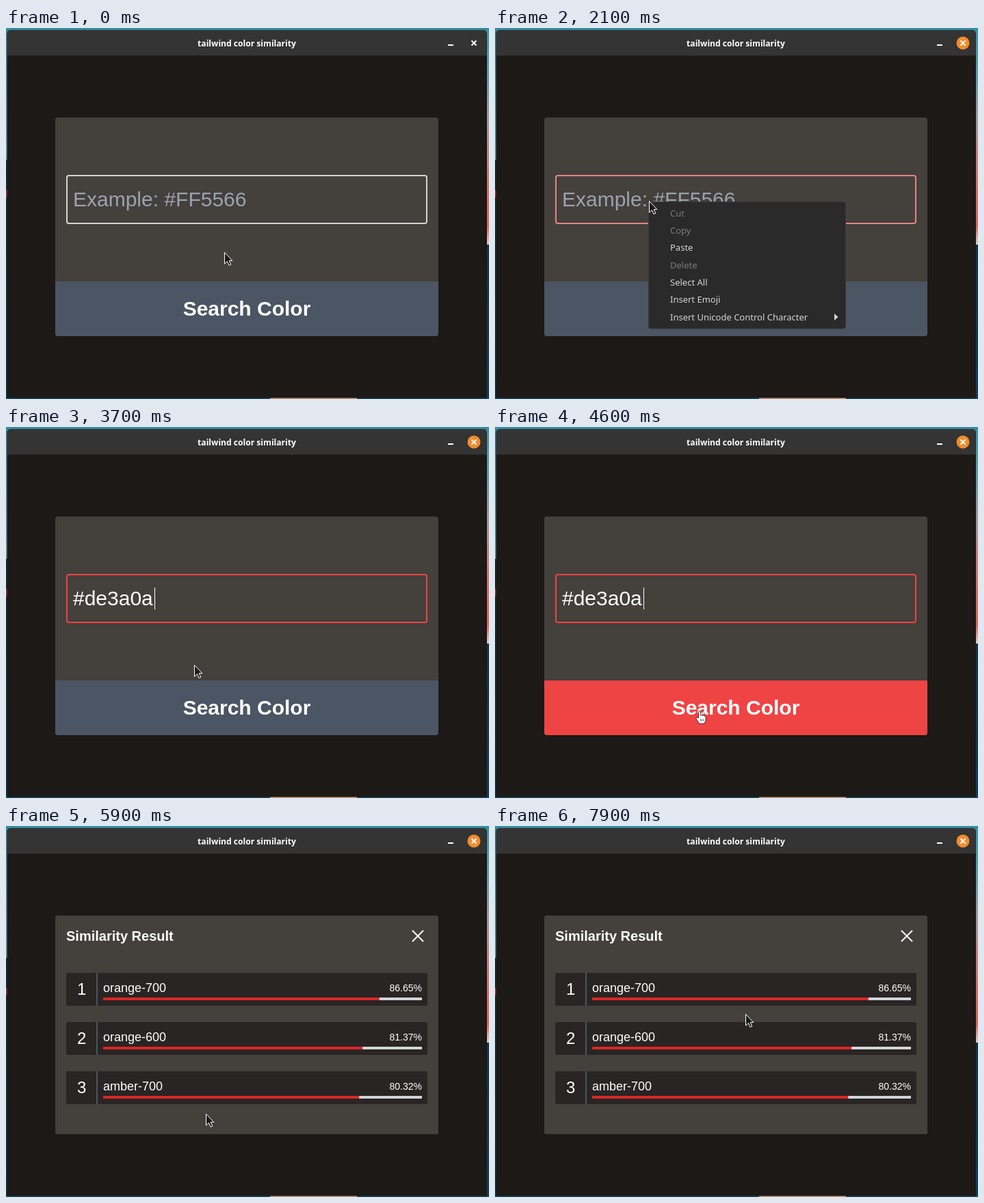
Recreate the animation shown at these times as an HTML page. Size 706x543 px, loop 8000 ms.

```html
<!DOCTYPE html>
<html lang="en">
<head>
<meta charset="utf-8">
<title>tailwind color similarity</title>
<style>
  html, body { margin: 0; width: 100%; height: 100%; overflow: hidden; background: #1c1917; }
  svg { display: block; width: 706px; height: 543px; cursor: default; }
  .label { font-family: "Liberation Sans", Arial, sans-serif; color: #fff; white-space: pre; }
  .bold { font-weight: 700; }
  .hint { color: #9ca3af; }
  text { font: 13px "Noto Sans", "Open Sans", sans-serif; fill: #d6d6d6; }
  text.off { fill: #7b7b7b; }
  text.title { font-size: 12.1px; font-weight: 700; fill: #fff; }
</style>
</head>
<body>
<svg viewBox="0 0 706 543" xmlns="http://www.w3.org/2000/svg">
  <defs>
    <linearGradient id="left" x2="0" y2="1">
      <stop offset="0" stop-color="#2f8495"/><stop offset=".35" stop-color="#5fa3ae"/>
      <stop offset=".35" stop-color="#12303f"/><stop offset="1" stop-color="#0b3a50"/>
    </linearGradient>
    <linearGradient id="right" x2="0" y2="1">
      <stop offset="0" stop-color="#3a96a5"/><stop offset=".12" stop-color="#5aa0ab"/>
      <stop offset=".25" stop-color="#a59a9e"/><stop offset=".42" stop-color="#d8736a"/>
      <stop offset=".53" stop-color="#dd655c"/><stop offset=".58" stop-color="#d9cfca"/>
      <stop offset=".58" stop-color="#123448"/><stop offset="1" stop-color="#0c4159"/>
    </linearGradient>
  </defs>

  <!-- desktop -->
  <rect width="706" height="5" fill="#358c9d"/>
  <rect y="4" width="4" height="539" fill="url(#left)"/>
  <rect y="237" width="4" height="11" fill="#a33a35"/>
  <rect x="700" y="4" width="6" height="539" fill="url(#right)"/>
  <rect y="540" width="706" height="3" fill="#0f4559"/>
  <rect x="386" y="541" width="127" height="2" fill="#d09a75"/>

  <!-- window -->
  <path d="M1.500 541.500V9q0-6 6-6H697q6 0 6 6V541.500Z" fill="#1c1917"/>
  <path d="M2 40V9q0-6 6-6H696.500q6 0 6 6V40Z" fill="#343434"/>
  <path d="M2 40.500H702.500" stroke="#262524"/>
  <text class="title" x="352" y="27" text-anchor="middle">tailwind color similarity</text>
  <rect x="646" y="24" width="8" height="2" fill="#fff"/>
  <circle id="close" cx="684" cy="22" r="9.500" fill="#f28b2d"/>
  <path d="M680.500 18.500l7 7m0-7l-7 7" stroke="#fff" stroke-width="2"/>

  <!-- search form -->
  <rect x="72" y="131" width="560" height="320" rx="4" fill="#44403c"/>
  <path id="button" d="M72 371H632V447q0 4-4 4H76q-4 0-4-4Z"/>
  <rect id="field" x="89" y="216" width="526" height="70" rx="3" fill="none" stroke-width="2"/>
  <g id="form"></g>
  <rect id="caret" y="235" width="1" height="32" fill="#fff"/>

  <!-- result panel -->
  <g id="result">
    <rect x="72" y="131" width="560" height="320" rx="4" fill="#44403c"/>
    <path d="M594.500 153.500l15 15m0-15l-15 15" stroke="#fff" stroke-width="2" stroke-linecap="round"/>
    <g id="rows"></g>
  </g>

  <!-- context menu -->
  <g id="menu">
    <rect x="224.500" y="254.500" width="288" height="185.500" rx="3" fill="#2a2a2a" stroke="#3a3937"/>
    <rect id="hover" x="225" y="309" width="287" height="25" fill="#414141"/>
    <g id="items"></g>
    <path d="M496 418l5.500 5-5.500 5Z" fill="#d6d6d6"/>
  </g>

  <!-- pointers, hot spot at 0,0 -->
  <g id="pointer">
    <path id="arrow" d="M.5.500V17.200L4.400 13.600 7 19.400 9.800 18.200 7.200 12.500H11.800Z" fill="#1b1b1b" stroke="#fff" stroke-linejoin="round"/>
    <g id="beam" fill="none">
      <path d="M-3.500-7.500H3.500M-3.500 7.500H3.500M0-7.500V7.500" stroke="#fff" stroke-width="3"/>
      <path d="M-3-7.500H3M-3 7.500H3M0-7.500V7.500" stroke="#1b1b1b"/>
    </g>
    <g id="hand" stroke="#1b1b1b" stroke-width=".8">
      <path d="M-1.500 10V1q0-1.500 1.500-1.500T1.500 1V6q1.500-1 2.700.300 1.500-.800 2.500.500 2.300-.300 2.300 2V13q0 2-1.500 3.500V18H-1.500V16L-5 11q-.500-2 1.500-2Z" fill="#fff"/>
      <path d="M1.500 11.500v3M3.700 11.500v3M5.900 11.500v3"/>
    </g>
  </g>
</svg>
<script>
const LOOP = 8000, STEP = 100;
const FOCUS = 1000, MENU = 2050, PASTE = 3300, HOVER = 3950, CLICK = 4650, REVEAL = 4900, DONE = 5300;
const RED = [239, 68, 68], LIGHT = [214, 211, 209], SLATE = [75, 85, 99];
const el = id => document.getElementById(id);

// page text placed by its baseline, in a box from x to x + width
function label(text, x, baseline, size, style = '', align = 'left', width = 300) {
  const ascent = Math.round(size * .905), height = ascent + Math.round(size * .212);
  return `<foreignObject x="${x}" y="${baseline - ascent}" width="${width}" height="${height}">
    <div xmlns="http://www.w3.org/1999/xhtml" class="label ${style}"
      style="font-size:${size}px;line-height:${height}px;text-align:${align}">${text}</div></foreignObject>`;
}

el('form').innerHTML = label('Search Color', 72, 421, 30, 'bold', 'center', 560) +
  `<g id="hint">${label('Example: #FF5566', 98, 261, 30, 'hint')}</g>` +
  `<g id="value">${label('#de3a0a', 98, 261, 30)}</g>`;

el('rows').innerHTML = label('Similarity Result', 88, 168, 20, 'bold') +
  [['orange-700', 86.65], ['orange-600', 81.37], ['amber-700', 80.32]].map(([name, score], i) => {
    const y = 215 + 72 * i;
    return `<rect x="88" y="${y}" width="528" height="48" rx="2" fill="#292524"/>
      <rect x="132" y="${y}" width="2" height="48" fill="#4b5563"/>
      <rect x="142" y="${y + 36}" width="466" height="4" fill="#d1d5db"/>
      <rect x="142" y="${y + 36}" width="${4.66 * score}" height="4" fill="#dc2626"/>` +
      label(i + 1, 104, y + 32, 24) + label(name, 142, y + 28, 18) +
      label(score + '%', 308, y + 27, 14, '', 'right');
  }).join('');

const items = ['Cut', 'Copy', 'Paste', 'Delete', 'Select All', 'Insert Emoji', 'Insert Unicode Control Character'];
el('items').innerHTML = items.map((name, i) =>
  `<text x="256" y="${Math.round(275.8 + 25.3 * i)}" class="${/Cut|Copy|Delete/.test(name) ? 'off' : ''}">${name}</text>`).join('');

// pointer strokes: from, to, x, y
const moves = [
  [0, 600, 229, 213], [600, 1100, 234, 246], [1300, 1600, 225, 253], [2300, 2700, 258, 337],
  [2800, 3000, 264, 317], [3400, 4200, 299, 416], [5800, 5900, 292, 421], [5900, 6500, 150, 200],
  [6500, 7000, 198, 215], [7000, 7500, 168, 231], [7600, 7900, 366, 275]
];

// cubic-bezier(.4, 0, .2, 1)
function ease(x) {
  let lo = 0, hi = 1, u = .5;
  for (let i = 0; i < 20; i++) {
    u = (lo + hi) / 2;
    if (1.2 * u * (1 - u) ** 2 + .6 * u * u * (1 - u) + u ** 3 < x) lo = u; else hi = u;
  }
  return 3 * u * u * (1 - u) + u ** 3;
}
const part = (t, from, to) => Math.min(1, Math.max(0, (t - from) / (to - from)));
const fade = (t, from, length = 150) => ease(part(t, from, from + length));
const within = (t, from, to) => t >= from && t < to;
const mix = (a, b, k) => `rgb(${a.map((v, i) => Math.round(v + (b[i] - v) * k))})`;
const show = (id, on) => { el(id).style.display = on ? '' : 'none'; };

function place(t) {
  let x = 319, y = 328;
  for (const [from, to, tx, ty] of moves) {
    const p = part(t, from, to), k = p * p * (3 - 2 * p);
    x += (tx - x) * k;
    y += (ty - y) * k;
  }
  return [Math.round(x), Math.round(y)];
}

function pointerShape(t, y) {
  if (t >= DONE - STEP) return 'arrow';
  if (y > 371) return 'hand';
  const overField = t < MENU && y < 287;
  return overField || within(t, PASTE, PASTE + STEP) ? 'beam' : 'arrow';
}

function render(t) {
  const [x, y] = place(t), shape = pointerShape(t, y);
  const pasted = t > PASTE;
  const glow = fade(t, FOCUS) - fade(t, MENU) + fade(t, PASTE + 40) - fade(t, CLICK);
  const active = within(t, FOCUS, MENU) || (pasted && t < CLICK);
  const blink = (t - (pasted ? PASTE + STEP : FOCUS)) % 1200 < 600;

  show('close', t >= FOCUS);
  el('field').setAttribute('stroke', mix(LIGHT, RED, glow));
  el('button').setAttribute('fill', mix(SLATE, RED, fade(t, HOVER, 250)));
  show('hint', !pasted);
  show('value', pasted);
  show('caret', active && blink);
  el('caret').setAttribute('x', pasted ? 217 : 98);
  show('menu', within(t, MENU, PASTE));
  show('hover', t >= 2900);
  show('result', t > REVEAL);
  el('result').setAttribute('opacity', fade(t, REVEAL, DONE - REVEAL));
  for (const id of ['arrow', 'beam', 'hand']) show(id, id === shape);
  el('pointer').setAttribute('transform', `translate(${x} ${y})`);
}

const start = performance.now();
function tick() {
  // the screen advances in whole steps; the small lead absorbs timer jitter
  const t = (performance.now() - start + 30) % LOOP;
  render(Math.floor(t / STEP) * STEP);
  requestAnimationFrame(tick);
}
tick();
</script>
</body>
</html>
```
